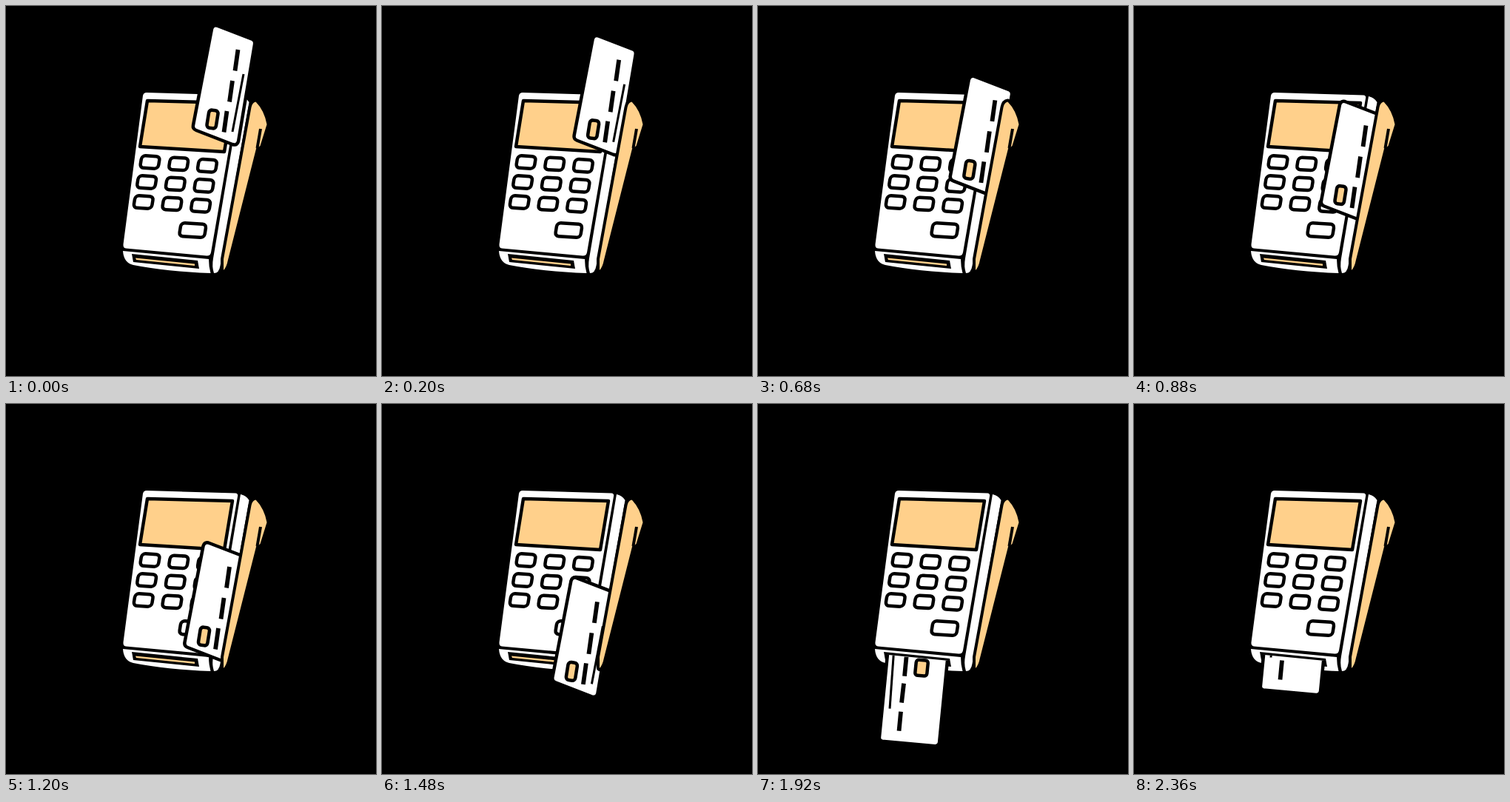
Animation, 500 px wide and 500 px high, one loop 3000 ms. Source, as an HTML page:

```html
<!DOCTYPE html>
<html>
<head>
<meta charset="utf-8">
<style>
  html, body { margin: 0; height: 100%; background: #000; overflow: hidden; }
  svg { display: block; width: 100%; height: 100%; }
  .white { fill: #fff; }
  .peach { fill: #ffd08b; }
  .ink { stroke: #000; stroke-width: 4.5; stroke-linejoin: round; }
  .mark { fill: none; stroke: #000; stroke-width: 5.8; }
  .thin { fill: none; stroke: #000; stroke-width: 3; }
  .side { stroke: #000; stroke-width: 8; stroke-linejoin: round; paint-order: stroke; }
</style>
</head>
<body>
<svg viewBox="0 0 500 500">
  <clipPath id="belowSlot"><path d="M100 331.5L320 353V500H100Z"/></clipPath>

  <!-- terminal front -->
  <path class="white" d="M190 117L310 120.500Q314 121 313 125L277 333Q276 338 271 337.500L162 327.500Q158 327 158.500 322L185 121Q186 117 190 117Z"/>
  <path class="white" d="M158 331L274 342Q274 352 276.500 361Q218 359 172 350Q159 347 158 331Z"/>
  <path class="white" d="M317 122Q325 124 328.500 130L289.500 351Q288 361 281 361Q278 352 280 341Z"/>
  <path class="peach ink" d="M191 128L306 131L295 197L181 190Z"/>
  <g id="keys" class="white ink"></g>
  <path d="M170 335L259 344L261 355L172 346Z"/>
  <path class="peach" d="M175 340.500L255 348.500V351L176 343Z"/>

  <g clip-path="url(#belowSlot)">
    <g id="inserted">
      <path class="white ink" d="M176 328L257 336L245 458Q244 463 239 462.500L168 456Q163 455 164 450Z"/>
      <path class="thin" d="M183.500 335L178 412"/>
      <path class="mark" d="M200.500 342L198 368M197 378L194 404M193 416L190.500 442"/>
      <rect class="peach ink" x="-8" y="-10.500" width="16" height="21" rx="3.500" transform="matrix(1 .08 -.1 1 221 357)"/>
    </g>
  </g>

  <g id="swiped">
    <path class="white ink" d="M285 26.500L333 45Q337 47 336 52L314 183Q312 189 306 187L257 168Q252 166 253 161L278 31Q280 25 285 26.500Z"/>
    <path class="thin" d="M321 92L306 170"/>
    <path class="mark" d="M313.500 59L309.500 87.500M306 101L302 129.500M298.500 142L294.500 170.500"/>
    <rect class="peach ink" x="-6.200" y="-12" width="12.400" height="24" rx="4" transform="matrix(1 .15 -.16 1 279 153)"/>
  </g>

  <!-- terminal side, in front of the swiped card -->
  <path class="peach side" d="M331.500 137Q333 130 337.500 129.500Q349 141 352.500 160L343.500 189L341 191L338.500 191L300 343Q298 353 294 357V342Z"/>
  <path class="mark" style="stroke-width:4" d="M344 166L339.500 192"/>
</svg>
<script>
const LOOP = 3000, STEP = 40;
const swiped = document.getElementById('swiped');
const inserted = document.getElementById('inserted');

// Each key: time, x, y
const swipePath = [[0, 0, 0], [240, 8, 16.5], [480, 13, 38], [560, 11, 48], [880, 0, 102.5], [1200, -11.5, 161], [1540, -25, 218.5]];
const insertPath = [[1640, -17, 175], [1900, -0.3, 3], [2240, 5.3, -53], [2360, 7, -69.5], [LOOP, 7, -69.5]];

function addKey(x, y, w, h) {
  document.getElementById('keys').innerHTML +=
    `<rect x="${-w / 2}" y="${-h / 2}" width="${w}" height="${h}" rx="5" transform="matrix(1 .06 -.16 1 ${x} ${y})"/>`;
}
for (let row = 0; row < 3; row++)
  for (let col = 0; col < 3; col++)
    addKey(194.5 + 38.7 * col - 4.4 * row, 211 + 2.4 * col + 27 * row, 24.5, 16.5);
addKey(252.3, 303, 34, 18);

function place(card, path, t) {
  const next = path.findIndex(key => key[0] > t);
  card.style.display = next > 0 ? '' : 'none';
  if (next < 1) return;
  const [t0, x0, y0] = path[next - 1], [t1, x1, y1] = path[next];
  const k = (t - t0) / (t1 - t0);
  card.setAttribute('transform', `translate(${x0 + (x1 - x0) * k} ${y0 + (y1 - y0) * k})`);
}

function draw() {
  const t = Math.floor(performance.now() % LOOP / STEP) * STEP;
  place(swiped, swipePath, t);
  place(inserted, insertPath, t);
  requestAnimationFrame(draw);
}
draw();
</script>
</body>
</html>
```
